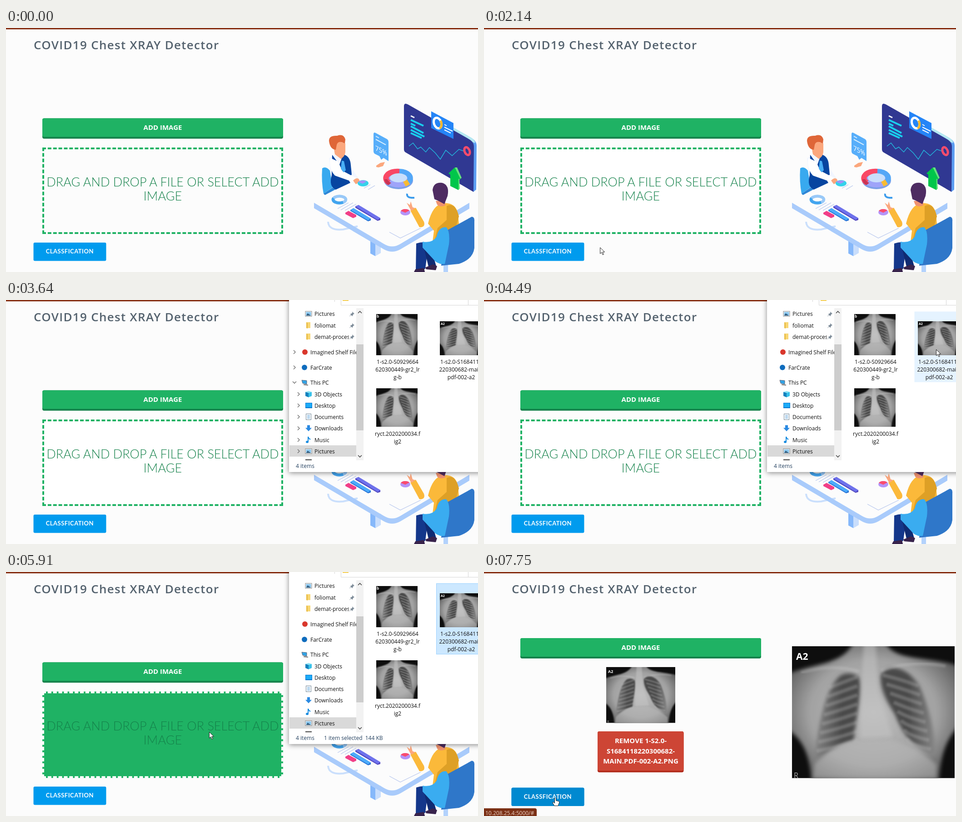
These frames come from a looping animation (1039x539 px, 8000 ms). An HTML page:

```html
<!DOCTYPE html>
<html lang="en">
<head>
<meta charset="utf-8">
<title>Chest XRAY Detector</title>
<style>
html, body { margin: 0; width: 100%; height: 100%; overflow: hidden; background: #fcfcfc; }
#zone { position: absolute; left: 80px; top: 264px; width: 530px; height: 191px; box-sizing: border-box; border: 4px dashed #1fb264; }
svg.stage { position: absolute; left: 0; top: 0; }
text { font-family: "Open Sans", "Noto Sans", sans-serif; font-size: 12px; fill: #111; }
.mid { text-anchor: middle; }
.btn { font-size: 15px; font-weight: 700; fill: #fff; }
.drop { font: 300 27px Lato, sans-serif; fill: #15824b; }
.line { fill: none; }
#win { filter: drop-shadow(0 2px 6px rgba(0,0,0,.45)); }
</style>
</head>
<body>
<div id="zone"></div>
<svg class="stage" width="1039" height="539" viewBox="0 0 1039 539">
<defs>
  <radialGradient id="flesh" cx=".5" cy=".5" r=".62">
    <stop offset="0" stop-color="#bdbdbd"/><stop offset=".6" stop-color="#a2a2a2"/><stop offset="1" stop-color="#4c4c4c"/>
  </radialGradient>
  <linearGradient id="lungL"><stop offset="0" stop-color="#858585"/><stop offset=".6" stop-color="#484848"/><stop offset="1" stop-color="#4a4a4a"/></linearGradient>
  <linearGradient id="lungR"><stop offset="0" stop-color="#484848"/><stop offset=".5" stop-color="#484848"/><stop offset="1" stop-color="#888"/></linearGradient>
  <filter id="soft"><feGaussianBlur stdDeviation="4"/></filter>
  <filter id="haze"><feGaussianBlur stdDeviation="2"/></filter>
  <clipPath id="sideClip"><rect x="623" y="18" width="148" height="336"/></clipPath>
  <clipPath id="viewClip"><rect x="788" y="13" width="251" height="341"/></clipPath>
  <clipPath id="nameClip"><rect x="0" y="-20" width="76" height="40"/></clipPath>
  <symbol id="xray" viewBox="0 0 358 292" preserveAspectRatio="none">
    <rect width="358" height="292" fill="#0e0e0e"/>
    <path d="M-10 62C45 36 112 44 136 -10H204C226 36 300 20 368 44V175C340 205 326 240 324 302H42C42 250 26 205 -10 185Z" fill="url(#flesh)" filter="url(#soft)"/>
    <g filter="url(#soft)">
      <path d="M108 64C82 80 60 150 49 254C66 246 92 218 136 208C142 150 156 100 148 70C136 58 120 58 108 64Z" fill="url(#lungL)"/>
      <path d="M195 66C194 95 208 122 226 150C240 185 258 212 278 222L314 242C320 205 300 125 278 84C252 44 206 36 195 66Z" fill="url(#lungR)"/>
    </g>
    <path id="ribs" fill="none" stroke="#c4c4c4" stroke-opacity=".28" stroke-width="8" filter="url(#haze)"/>
    <path d="M20 58Q90 38 148 56M338 44Q260 30 196 54" fill="none" stroke="#ddd" stroke-opacity=".22" stroke-width="7" filter="url(#haze)"/>
    <path d="M50 260Q100 215 150 208L214 206Q270 220 318 262V292H46Z" fill="#b8b8b8" opacity=".55" filter="url(#soft)"/>
    <path d="M158 -10H184L190 100 222 200 150 204 152 90Z" fill="#c6c6c6" opacity=".5" filter="url(#soft)"/>
  </symbol>
  <symbol id="folder" viewBox="0 0 66 90">
    <path d="M8 1H53V45L57 48V78L20 88V14Z" fill="#f4d678"/><path d="M0 3L8 1 20 14V88L0 74Z" fill="#fce9a6"/>
  </symbol>
  <g id="star"><path d="M7 0l2 5h5L10 8.500 11.500 14 7 10.500 2.500 14 4 8.500 0 5h5Z" fill="#1e8fe8"/></g>
  <g id="desk"><rect y="1" width="15" height="12" fill="#0877cf"/><rect x="1" y="2" width="13" height="9" fill="#1cabf7"/></g>
  <g id="down"><path d="M4 0h6v6h4L7 13.500 0 6h4Z" fill="#2b8ae2"/></g>
  <g id="doc"><rect x="1.500" y=".5" width="11" height="13" fill="#fff" stroke="#728798"/><path d="M4 4h6M4 7h6M4 10h6" stroke="#398dd0"/></g>
  <g id="pic"><rect y="1.500" width="14" height="11" fill="#fff" stroke="#888"/><rect x="1.500" y="3" width="11" height="8" fill="#8bc7ef"/><path d="M1.500 11L5 6l7.500 5Z" fill="#315d7f"/></g>
  <g id="dir"><path d="M2 0h9v13H2Z" fill="#f8d775"/><path d="M2 0l3 2v12l-3-1Z" fill="#e9bd48"/></g>
  <g id="red"><circle cx="8" cy="7" r="6" fill="#d9372c"/></g>
  <g id="blue"><circle cx="7" cy="7" r="6" fill="#0f6cbd"/></g>
  <g id="pc"><path d="M1 2l11 1v8L3 9Z" fill="#32a4e6" stroke="#667"/><path d="M5 12l10 1" stroke="#777" stroke-width="2"/></g>
  <g id="cube"><path d="M0 2l7 2v10L0 11Z" fill="#1681bd"/><path d="M7 4l7-2v9l-7 3Z" fill="#38c2ea"/><path d="M0 2l7-2 7 2-7 2Z" fill="#8be3f5"/></g>
  <g id="note"><path d="M6 11V0q1 4 5 6" stroke="#148be0" stroke-width="2" fill="none"/><ellipse cx="4" cy="11.500" rx="3" ry="2.500" fill="#148be0"/></g>
  <g id="film"><rect width="14" height="13" fill="#444"/><rect x="3" y="2" width="8" height="9" fill="#6aa4d8"/></g>
  <g id="pin" fill="#7d8b98"><path d="M5 0l5 5-2 .5-2 3-.5 2-5-5 2-.5 3-2Z"/><path d="M3 7L-.5 10.500" stroke="#7d8b98"/></g>
</defs>

<rect width="1039" height="3" fill="#8a3519"/>
<text x="61" y="47" style="font-size:26px;font-weight:600;letter-spacing:1.3px;fill:#54626e">COVID19 Chest XRAY Detector</text>

<g id="prompt"><text class="drop mid" x="345" y="350">DRAG AND DROP A FILE OR SELECT ADD</text><text class="drop mid" x="345" y="381">IMAGE</text></g>

<g id="add">
  <rect x="80" y="199.500" width="530" height="45" rx="4" fill="#15824b"/>
  <rect id="addFace" x="80" y="199.500" width="530" height="41" rx="4"/>
  <text class="btn mid" x="345" y="225">ADD IMAGE</text>
</g>
<g id="go">
  <rect x="60.500" y="474" width="160" height="40.500" rx="3" fill="#009bee"/>
  <rect id="goDark" x="60.500" y="474" width="160" height="40.500" rx="3" fill="#0089d0"/>
  <text class="mid" x="140.300" y="498" style="font:700 13px Lato,sans-serif;letter-spacing:.5px;fill:#fff">CLASSFICATION</text>
</g>

<g id="art">
  <!-- wall screen -->
  <path d="M980 219L1026 244Q1036 250 1036 260L1035 357 1029 362 1020 252Z" fill="#5c9df2"/>
  <path d="M980 217L1024 242Q1032 247 1033 254L1026 252 980 224Z" fill="#b5e8f2"/>
  <path d="M876 173Q876 164 885 169L1020 246Q1030 252 1030 262L1029 362 880 275Q876 273 876 268Z" fill="#303892"/>
  <path d="M891 194l8 4M965 213l7 4M965 219l18 9M965 225l12 6" stroke="#fff" stroke-width="3"/>
  <path d="M891 203l28 13M891 211l10 5M891 217l28 15M891 225l30 15M891 232l24 11" stroke="#19cfee" stroke-width="4"/>
  <path class="line" d="M887 261l9-7 10 13 7-4 11 11 8-10 13 12 11 14 12-20 14 12 15-14 11 4" stroke="#23b4db" stroke-width="1.500"/>
  <ellipse cx="1015" cy="272" rx="5.500" ry="9" transform="rotate(-22 1015 272)" class="line" stroke="#f84c6c" stroke-width="5"/>
  <path d="M936 184L985 210V245L936 221Z" fill="#2585f7"/>
  <g class="line" stroke-width="5" transform="rotate(-20 950 210)"><ellipse cx="950" cy="210" rx="8" ry="12" stroke="#fff"/><path d="M950 222A8 12 0 0 0 958 207" stroke="#f9b934"/></g>
  <path d="M965 213l5 3M965 219l18 9M965 225l14 7" stroke="#fff" stroke-width="2"/>
  <!-- message card -->
  <path d="M809 235Q809 229 814 232L838 245Q842 247 842 252V294L831 287 826 291 822 283 812 278Q809 276 809 272Z" fill="#57aefa"/>
  <path d="M814 239l7 4M814 246l22 12" stroke="#d9efff" stroke-width="2"/>
  <text transform="matrix(.88 .42 0 1 813 270)" style="font-size:15px;fill:#fff">75%</text>
  <path d="M815 304l9-6 10-2-4 9-10 3-5-1Z" fill="#fba77d"/>
  <!-- table -->
  <path d="M709 428Q710 448 742 445L774 438" class="line" stroke="#cadffc" stroke-width="4"/>
  <path d="M802 470h11v34l-11-6Z" fill="#86b8fa"/><path d="M813 472h12v25l-12 7Z" fill="#c9defc"/>
  <path d="M678 386V398L832 489Q850 499 868 489L1020 399V386L868 477Q850 488 832 477Z" fill="#a9cbfb"/>
  <path class="line" d="M844 451l24 13 45-22M730 399l24-13M737 402l27-16M746 403l25-14M788 354l14-8M797 357l15-9" stroke="#b9c8ee" stroke-width="1.300"/>
  <ellipse cx="734" cy="379" rx="14" ry="7.500" class="line" stroke="#99c9f8" stroke-width="6.500"/>
  <path d="M721 376A14 7.500 0 0 0 742 385" class="line" stroke="#43a5ef" stroke-width="6.500"/>
  <path d="M769 394l7-3 48 29v4l-6 2-49-29Z" fill="#5147bd"/><path d="M769 394l7-3 48 29-6 4Z" fill="#6e72ed"/>
  <path d="M758 402l7-4 38 23v4l-6 2-39-23Z" fill="#236fd4"/><path d="M758 402l7-4 38 23-6 4Z" fill="#4cabfa"/>
  <path d="M747 408l7-4 17 9v4l-7 3-17-9Z" fill="#f13f88"/>
  <ellipse cx="879" cy="407" rx="11" ry="7" fill="#b494f8"/><path d="M869 404a11 7 0 0 1 19-1l-9 5Z" fill="#fa4c6f"/>
  <path d="M883 366q-2 10 16 9" class="line" stroke="#3c9cec" stroke-width="4"/>
  <!-- ring chart -->
  <ellipse cx="864" cy="337" rx="32" ry="19" fill="#7da0e8"/><ellipse cx="864" cy="332" rx="31" ry="20" fill="#9ea4f9"/>
  <g class="line" stroke-width="12">
    <path d="M843 342A25 15 0 0 1 866 317" stroke="#f94865"/><path d="M866 317A25 15 0 0 1 886 340" stroke="#54a7f7"/>
    <path d="M886 340L877 345" stroke="#f8bb33"/>
  </g>
  <path d="M833 334q1 9 9 13l6-5q-7-3-9-8Z" fill="#c93453"/><ellipse cx="864" cy="331" rx="19" ry="10" fill="#c9dffc"/>
  <!-- seated left -->
  <path d="M696 310Q704 304 713 315L719 352 699 366Q694 340 696 310Z" fill="#38a9ef"/>
  <path d="M718 353l23-9-7 8-32 17-3-3Z" fill="#2d86d6"/>
  <path d="M711 288Q724 276 744 277L758 306 779 336 767 343 741 331 715 326Z" fill="#f2f6ff"/>
  <path d="M718 280L734 302 742 279Q758 283 759 303L761 324Q750 331 758 342L726 357Q710 350 717 325Z" fill="#0745a0"/>
  <path d="M714 287Q710 311 724 326L766 341 776 334 740 315 731 295Z" fill="#fff"/>
  <path d="M739 293l5 1 4 20-5 5-6-8Z" fill="#48aef5"/>
  <path d="M764 337q8-8 13-3l2 6-9 5Z" fill="#fba77d"/>
  <path d="M720 257Q728 247 747 255V274Q746 284 737 289L724 279Z" fill="#fba77d"/>
  <path d="M711 249Q711 237 729 238 743 233 747 246L746 255Q731 247 728 258L726 269Q713 268 711 249Z" fill="#df6638"/>
  <ellipse cx="786" cy="343" rx="12" ry="7" fill="#34d2ea"/><path d="M775 340q9-6 19-1l-9 5Z" fill="#a392f8"/>
  <!-- green arrow -->
  <path d="M988 308l5 0 10 23-5 4 1 20-4 3Z" fill="#65e27d"/>
  <path d="M988 308L974 321l4 3v25l18 9V333l5 2Z" fill="#00c64a"/>
  <!-- seated right -->
  <path d="M963 518h10v21h-10Z" fill="#b3d2fc"/>
  <path d="M903 476Q920 470 942 476L928 493 923 532 902 538Z" fill="#14378b"/><path d="M921 490L936 487 947 526 930 527Z" fill="#102b72"/>
  <path d="M898 539l3-6 19-3 2 9ZM923 529l17-7 9 4-3 9-21-2Z" fill="#38234c"/>
  <path d="M929 432Q939 390 963 387 990 385 995 411L998 444 967 476 939 472 942 448Z" fill="#fbb93a"/>
  <path d="M970 393Q989 384 997 416L989 445 958 466 943 470 950 442 970 424Z" fill="#dea026"/>
  <path d="M890 403l12-6 18 31Q924 441 910 440Z" fill="#fbb93a"/>
  <path d="M892 404l-10-18 7 5 2-8 4 13 6 2Z" fill="#fba77d"/>
  <path d="M946 382h21v10q-12 5-18-2Z" fill="#ef926f"/>
  <path d="M939 358Q941 340 960 342 977 347 972 371L965 389 952 382 943 378Z" fill="#4e2c62"/>
  <path d="M969 448L1025 417Q1032 417 1031 427V486Q1028 511 997 521L958 525 963 474Z" fill="#2f77c9"/>
  <path d="M917 472Q938 476 948 461 952 439 969 440 978 449 975 478L966 521Q949 523 940 510L917 485Z" fill="#3aacf0"/>
</g>

<g id="result">
  <use href="#xray" x="678" y="164" width="358" height="291.500"/>
  <text x="687" y="194" style="font-size:21px;font-weight:700;fill:#fff">A2</text><text x="682" y="455" style="font-size:16px;fill:#aaa">R</text>
  <use href="#xray" x="269" y="210" width="152" height="123.500"/>
  <text x="273" y="223" style="font-size:9px;font-weight:700;fill:#fff">A2</text><text x="271" y="333" style="font-size:7px;fill:#aaa">R</text>
  <rect x="250" y="352" width="189.500" height="90.500" rx="4" fill="#b02818"/><rect x="250" y="352" width="189.500" height="87" rx="4" fill="#cd4535"/>
  <text class="btn mid" x="345" y="378">REMOVE 1-S2.0-</text><text class="btn mid" x="345" y="400.500">S1684118220300682-</text><text class="btn mid" x="345" y="423">MAIN.PDF-002-A2.PNG</text>
</g>

<g id="win">
  <rect x="623" y="-10" width="430" height="390" fill="#fff"/>
  <path class="line" d="M737.500 0V11.500H1017.500V0M1017.500 11.500H1039M723.500 0V4" stroke="#d5d5d5"/>
  <rect id="place" x="741" y="0" width="13" height="2"/>
  <g clip-path="url(#sideClip)"><g id="side">
    <rect id="near" x="624" y="136" width="147" height="25" fill="#cce8ff"/><rect id="far" x="624" y="439" width="147" height="25" fill="#d9d9d9"/>
    <g id="rows"></g>
  </g></g>
  <rect x="771" y="18" width="16" height="336" fill="#f2f2f2"/><rect id="thumb" x="771" width="16" height="190" fill="#cdcdcd"/>
  <path class="line" d="M775 29l4-4 4 4M775 343l4 4 4-4" stroke="#505050" stroke-width="1.700"/>
  <g id="home" clip-path="url(#viewClip)">
    <use href="#folder" x="829" y="37" width="66" height="90"/><use href="#folder" x="963" y="37" width="66" height="90"/>
    <use href="#folder" x="829" y="162" width="66" height="90"/><use href="#folder" x="963" y="162" width="66" height="90"/>
    <path d="M980 44h37l10 10v65l-42 3Z" fill="#fff" stroke="#ddd"/><path d="M1006 53l12 13V54Z" fill="#ddd"/>
    <path d="M851 170l38 4 4 68-44 6Z" fill="#fff" stroke="#ddd"/><circle cx="881" cy="207" r="7" fill="#e3322b"/>
    <rect x="846" y="175" width="27" height="68" fill="#4b0e2c"/>
    <path d="M977 178l25-9v71l-22 8Z" fill="#555"/><path d="M1002 169l26 8v65l-26 4Z" fill="#272727"/><path d="M980 193l20-7M980 206l20-7M980 219l20-7M1004 190l21 6M1004 205l21 6M1004 220l21 6M990 178v65" stroke="#aaa" stroke-width="2"/>
    <rect x="815.500" y="280.500" width="90" height="55" fill="#fff" stroke="#222" stroke-width="1.500"/><path d="M821 289h70M821 293h48" stroke="#555" stroke-width="1.500"/>
    <path d="M826 303h10v20h-10Zm30 2h14v16h-14Zm20 0h6v16h-6Zm12-1h10v20h-10Z" fill="#8ccb87"/><path d="M821 329h74M840 305v18m5-18v18" stroke="#9aa" stroke-width="1.500"/>
    <rect x="949" y="300" width="91" height="36" fill="#1d1d1d"/><path d="M953 307h50M953 313h85M953 318h85M953 323h85M953 329h85" stroke="#777" stroke-dasharray="9 3 5 4"/>
    <g class="mid"><text x="862" y="141">Camera Roll</text><text x="996" y="141">conf</text><text x="862" y="266">mani</text><text x="996" y="266">normal</text><text x="862" y="355">1</text><text x="996" y="355">Capture</text></g>
  </g>
  <g id="scans">
    <rect id="pick" x="947.500" y="25.500" width="110" height="156"/>
    <use href="#xray" x="815" y="31" width="91" height="91"/><use href="#xray" x="955" y="47" width="91" height="75"/><use href="#xray" x="815" y="195" width="91" height="85"/>
    <g style="font-weight:700"><text x="816" y="39" style="font-size:8px;fill:#fff">b</text><text x="957" y="55" style="font-size:7px;fill:#fff">A2</text></g>
    <g class="mid"><text x="862" y="141">1-s2.0-S0929664</text><text x="862" y="158">620300449-gr2_lr</text><text x="862" y="175">g-b</text>
    <text x="1002" y="141">1-s2.0-S1684118</text><text x="1002" y="158">220300682-main.</text><text x="1002" y="175">pdf-002-a2</text>
    <text x="862" y="300">ryct.2020200034.f</text><text x="862" y="317">ig2</text></g>
  </g>
  <text id="count" x="638" y="371" style="fill:#24405f"></text><text id="chosen" x="700" y="371" style="fill:#24405f;white-space:pre">1 item selected  144 KB</text>
</g>

<g id="link"><path d="M0 522H112Q116 522 116 526V539H0Z" fill="#7b3015"/><text x="3" y="537" style="fill:#ecd2c5">10.208.25.4:5000/#</text></g>

<g id="mouse">
  <g id="drag">
    <rect x="-44" y="-95" width="109" height="109" rx="2" fill="#c4e3f2" fill-opacity=".42" stroke="#dcecf4"/>
    <use href="#xray" x="-38" y="-72" width="92" height="76" opacity=".78"/><text x="-36" y="-63" style="font-size:7px;font-weight:700;fill:#fff">A2</text>
    <rect x="22.500" y="16.500" width="56" height="20" fill="#fff" stroke="#aaa"/><path d="M27 26h12M33 20v12" stroke="#1a4ed0" stroke-width="2"/><text x="42" y="31" style="fill:#1d3fa5">Copy</text>
    <circle cy="2" r="12.500" fill="#dcd92b" opacity=".85"/>
  </g>
  <path id="arrow" d="M.5.5V14L3.700 11 6.200 16.500 8.300 15.500 5.900 10.300H10.500Z" fill="#fff" stroke="#222"/>
  <path id="hand" d="M-1.500 1.500Q0-.5 1.500 1.500V7l6 1.500q1.500.5 1.200 3L6 18.500H-2L-6 12q0-2 2-1.500l2.500 2Z" fill="#fff" stroke="#222"/>
</g>
</svg>
<script>
const $ = id => document.getElementById(id);
const show = (id, on) => $(id).style.display = on ? "" : "none";
const ramp = (t, a, b) => Math.min(1, Math.max(0, (t - a) / (b - a)));

// y, level, name, icon, pinned, arrow (1 closed, 2 open)
const rows = [
  [47.5, 0, "Quick access", "star", 0, 2], [73, 1, "Desktop", "desk", 1], [98, 1, "Downloads", "down", 1],
  [123.5, 1, "Documents", "doc", 1], [148.5, 1, "Pictures", "pic", 1], [174, 1, "foliomat", "dir", 1],
  [199, 1, "demat-process", "dir", 1], [233, 0, "Imagined Shelf Files", "red", 0, 1], [267, 0, "FarCrate", "blue", 0, 1],
  [300, 0, "This PC", "pc", 0, 2], [326, 1, "3D Objects", "cube", 0, 1], [351, 1, "Desktop", "desk", 0, 1],
  [376, 1, "Documents", "doc", 0, 1], [401.5, 1, "Downloads", "down", 0, 1], [427, 1, "Music", "note", 0, 1],
  [452, 1, "Pictures", "pic", 0, 1], [477, 1, "Videos", "film", 0, 1]
];
$("rows").innerHTML = rows.map(([y, level, name, icon, pin, fold]) => {
  const x = 650 + level * 9;
  const clip = pin ? ' clip-path="url(#nameClip)"' : "";
  const tip = fold == 2 ? "M631 -2l4 4 4 -4" : `M${633 + level * 9} -4l4 4 -4 4`;
  return `<g transform="translate(0 ${y})"><use href="#${icon}" x="${x}" y="-7"/>
    <g transform="translate(${x + 20} 4.500)"${clip}><text>${name}</text></g>
    ${pin ? '<use href="#pin" x="757" y="-5"/>' : ""}
    ${fold ? `<path class="fold line" d="${tip}" stroke="#666" stroke-width="1.300"/>` : ""}</g>`;
}).join("");

let ribs = "";
for (let i = 0; i < 8; i++) {
  const y = 92 + i * 20;
  ribs += `M${82 - i * 4} ${y}Q105 ${y - 10} 144 ${y - 24}M${278 + i * 4} ${y - 4}Q250 ${y - 16} ${200 + i * 8} ${y - 28}`;
}
$("ribs").setAttribute("d", ribs);

const trips = [
  [[580, 565, 8], [1220, 59, 481], [1320, 51, 518], [1680, 44, 542]],
  [[2140, 254, 485], [2810, 1045, 190]],
  [[4210, 1042, 296], [4490, 995, 109], [4590, 995, 109], [4680, 996, 96], [5050, 996, 96],
   [5440, 528, 313], [5520, 528, 313], [5800, 437, 348], [5910, 447, 353], [6650, 447, 353],
   [7390, 154, 498], [7470, 157, 498], [8000, 157, 498]]
];
function pointer(t) {
  const trip = trips.find(p => t >= p[0][0] && t <= p[p.length - 1][0]);
  if (!trip) return null;
  const i = trip.findIndex(p => p[0] >= t) || 1;
  const [a, b] = [trip[i - 1], trip[i]];
  const k = ramp(t, a[0], b[0]);
  return [a[1] + (b[1] - a[1]) * k, a[2] + (b[2] - a[2]) * k];
}

function draw(t) {
  const at = pointer(t);
  const over = (x, y, w, h) => at && at[0] >= x && at[0] < x + w && at[1] >= y && at[1] < y + h;
  const done = t >= 6090, moved = t >= 3640;
  const dropping = t > 5450 && !done;

  show("zone", !done);
  show("prompt", !done);
  const lit = dropping || (t < 2000 && over(80, 264, 530, 191));
  $("zone").style.background = lit ? "#1fb264" : t < 800 ? "#fcfcfc" : "#fff";
  $("zone").style.borderColor = lit ? "#fff" : "#1fb264";
  $("addFace").setAttribute("fill", t < 2000 && over(80, 200, 530, 44) ? "#1aa059" : "#1fb264");
  $("add").setAttribute("transform", `translate(0 ${done ? -53.5 : 0})`);
  $("go").setAttribute("transform", `translate(0 ${done ? 2.5 : 0})`);
  $("goDark").style.opacity = ramp(t, 7280, 7480);
  show("art", !done);
  show("result", done);

  const fade = ramp(t, 2230, 2420) * (1 - ramp(t, 6080, 6180));
  show("win", fade > 0);
  $("win").style.opacity = fade;
  $("side").setAttribute("transform", `translate(0 ${moved ? -118 : 0})`);
  $("thumb").setAttribute("y", moved ? 98 : 35);
  $("place").setAttribute("fill", moved ? "#f5cf55" : "#a8afb5");
  show("near", t < 3350);
  show("far", t >= 3350);
  show("home", !moved);
  show("scans", moved);
  document.querySelectorAll(".fold").forEach(f => f.style.opacity = 1 - ramp(t, 4210, 4480));
  const held = t >= 5050;
  $("pick").setAttribute("fill", held ? "#cce8ff" : t > 4380 ? "#e5f3ff" : "none");
  $("pick").setAttribute("stroke", held ? "#99d1ff" : "none");
  $("count").textContent = moved ? "4 items" : "13 items";
  show("chosen", held);

  show("mouse", at);
  if (at) $("mouse").setAttribute("transform", `translate(${at[0]} ${at[1]})`);
  show("drag", held && t < 5910);
  const onGo = done && over(61, 477, 159, 40);
  show("hand", onGo);
  show("arrow", !onGo);
  $("link").style.opacity = ramp(t, 7470, 7750);
}

const start = performance.now();
(function tick() {
  draw((performance.now() - start) % 8000);
  requestAnimationFrame(tick);
})();
</script>
</body>
</html>
```
